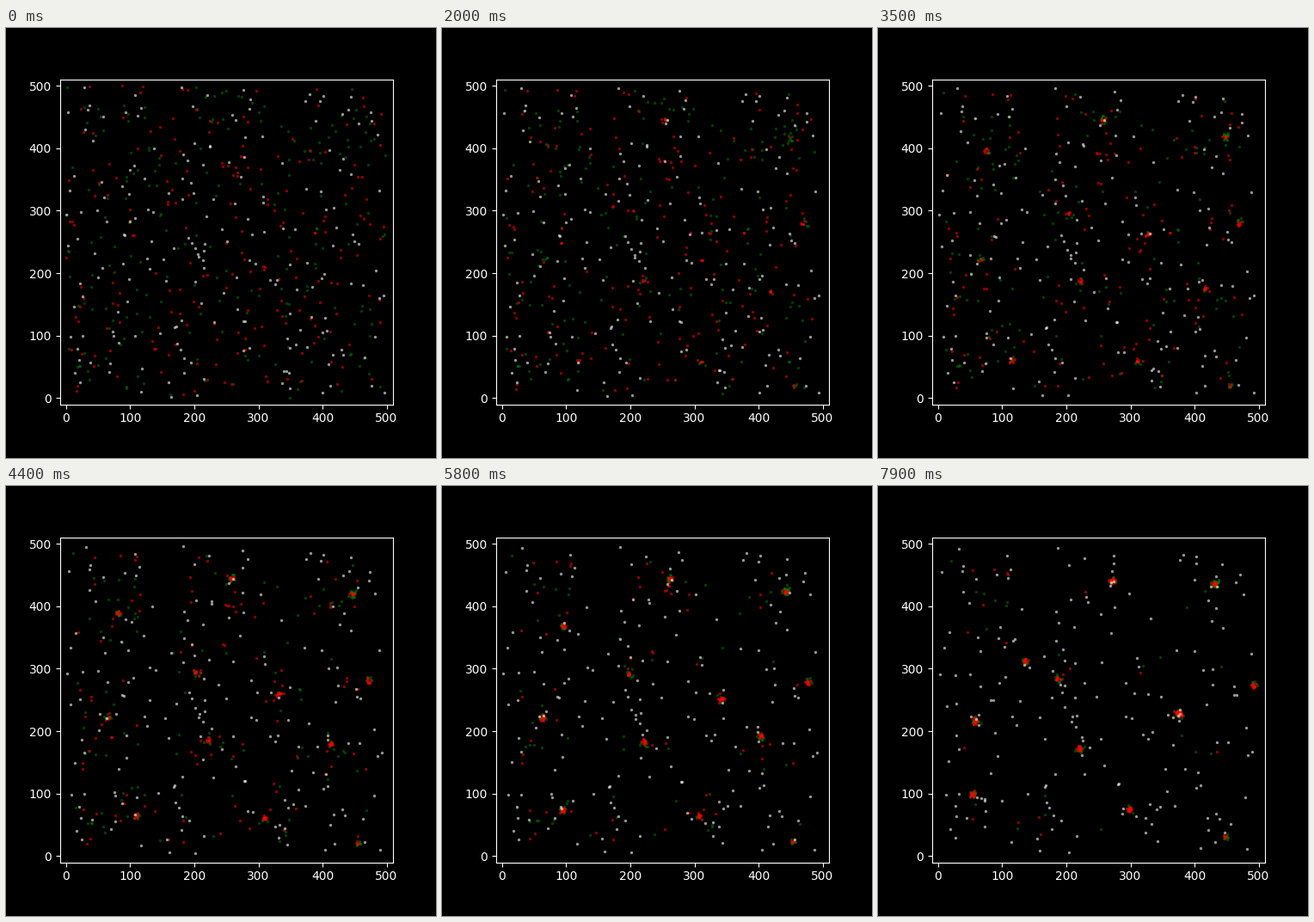
A matplotlib script that plays this animation: 500x500 px, repeating every 8000 ms.

```python
import numpy as np
import matplotlib.pyplot as plt
from matplotlib.animation import FuncAnimation

FRAMES, STEP = 80, 100
PER_KIND = 200
# colour, alpha, pull, spread inside a cluster
KINDS = [("green", 0.5, 50.0, 3.0), ("red", 0.55, 60.0, 2.0), ("white", 0.6, 7.0, 9.0)]

# Where clusters form and where they have drifted to by the end (x + yj)
DRIFTS = np.array([
    (70 + 405j, 138 + 309j),
    (121 + 57j, 52 + 101j),
    (322 + 265j, 376 + 229j),
    (420 + 170j, 376 + 229j),
    (468 + 281j, 493 + 273j),
    (450 + 416j, 432 + 437j),
    (206 + 296j, 185 + 283j),
    (66 + 224j, 57 + 216j),
    (222 + 190j, 220 + 172j),
    (312 + 57j, 298 + 75j),
    (255 + 446j, 272 + 441j),
    (456 + 18j, 447 + 31j),
])


def centres(u):
    start, end = DRIFTS.T
    return start + (end - start) * u ** 3


def simulate(rng, pull, spread):
    """Draw every dot to its nearest moving centre, faster when close."""
    pos = rng.uniform(0, 500, PER_KIND) + 1j * rng.uniform(0, 500, PER_KIND)
    offset = spread * (rng.normal(size=PER_KIND) + 1j * rng.normal(size=PER_KIND))
    strength = pull * rng.uniform(0.75, 1.25, PER_KIND)
    track = [pos]
    for u in np.linspace(0, 1, FRAMES)[1:]:
        gap = centres(u) - pos[:, None]
        nearest = np.abs(gap).argmin(axis=1)
        move = gap[np.arange(PER_KIND), nearest] + offset
        dist = np.abs(move) + 1e-6
        speed = np.minimum(strength * (0.4 + 1.2 * u) / dist, 0.5 * dist)
        pos = pos + move / dist * speed
        track.append(pos)
    return track


rng = np.random.default_rng(12)
tracks = [simulate(rng, pull, spread) for _, _, pull, spread in KINDS]

plt.style.use("dark_background")
plt.rcParams["font.family"] = "DejaVu Sans"
fig, ax = plt.subplots(figsize=(5, 5), dpi=100)
fig.subplots_adjust(left=0.125, right=0.9, bottom=0.125, top=0.88)
ax.set(xlim=(-10, 510), ylim=(-10, 510),
       xticks=range(0, 501, 100), yticks=range(0, 501, 100))
dots = [ax.plot([], [], ls="", marker="o", ms=2.4, mew=0, color=color, alpha=alpha)[0]
        for color, alpha, _, _ in KINDS]


def update(i):
    for line, track in zip(dots, tracks):
        line.set_data(track[i].real, track[i].imag)
    return dots


anim = FuncAnimation(fig, update, frames=FRAMES, interval=STEP,
                     repeat=True, repeat_delay=0)
plt.show()
```
